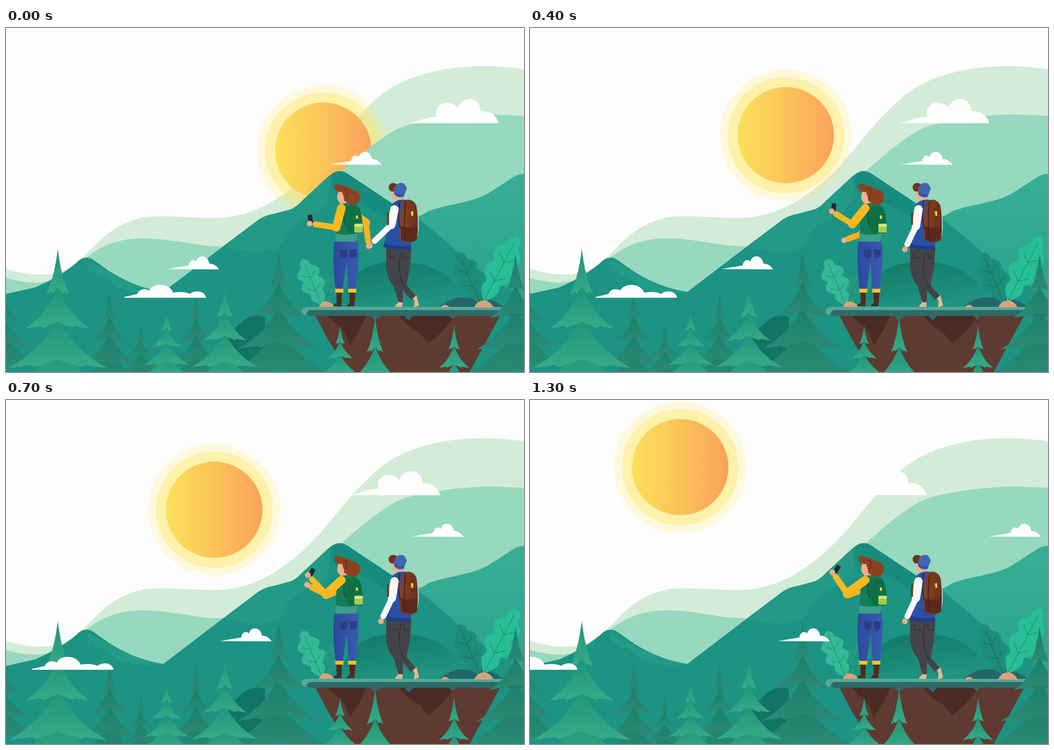
Animation of 800 by 533 pixels, one loop 1.4 s. Source, as an HTML page:

```html
<!DOCTYPE html>
<html lang="en">
<head>
<meta charset="utf-8">
<title>Hikers at sunrise</title>
<style>
html, body { margin: 0; height: 100%; overflow: hidden; background: #fdfdfd; }
svg { display: block; width: 100vw; height: 100vh; }
.limb { fill: none; stroke-linecap: round; stroke-linejoin: round; }
</style>
</head>
<body>
<svg viewBox="0 0 800 533" preserveAspectRatio="none">
  <defs>
    <linearGradient id="sunFill"><stop stop-color="#fbe158"/><stop offset=".55" stop-color="#fbc05a"/><stop offset="1" stop-color="#fba25a"/></linearGradient>
    <linearGradient id="light" x2="0" y2="1"><stop stop-color="#1f9377"/><stop offset="1" stop-color="#36ab89"/></linearGradient>
    <linearGradient id="dark" x2="0" y2="1"><stop stop-color="#1b806b"/><stop offset="1" stop-color="#2b8a75"/></linearGradient>
    <linearGradient id="moundFill" x2=".4" y2="1"><stop stop-color="#127868"/><stop offset="1" stop-color="#1f9480"/></linearGradient>
    <linearGradient id="rightFill" x2="0" y2="1"><stop stop-color="#37ae95"/><stop offset="1" stop-color="#249b88"/></linearGradient>
    <linearGradient id="jeans"><stop stop-color="#2c489c"/><stop offset="1" stop-color="#395bb0"/></linearGradient>
    <linearGradient id="leather"><stop stop-color="#86431f"/><stop offset="1" stop-color="#6b301c"/></linearGradient>
  </defs>

  <rect width="800" height="533" fill="#fdfdfd"/>
  <path fill="#d3ecd7" d="M0 373C25 381 45 384 70 381C130 372 135 308 215 293C250 289 300 296 335 294C390 289 436 258 476 216C505 186 525 152 573 109C610 76 670 59 740 59Q775 60 800 64V533H0Z"/>
  <g id="sun">
    <circle r="102" fill="#fde35a" opacity=".2"/>
    <circle r="90" fill="#fde35a" opacity=".4"/>
    <circle r="74.500" fill="url(#sunFill)"/>
  </g>
  <path fill="#96d9be" d="M0 387C30 397 62 397 85 386C120 362 145 326 210 326C260 326 300 340 340 338L420 330L515 225C540 203 570 175 603 157C640 140 720 134 750 134L800 136V533H0Z"/>
  <path fill="url(#rightFill)" d="M600 310C630 293 640 293 652 284C680 273 720 271 745 256L782 232Q790 226 800 226V533H560Z"/>

  <!-- mountains -->
  <path fill="#1c9383" d="M0 412L45 402Q90 382 114 359Q125 352 136 360L160 377C190 396 218 405 243 409L337 337L390 297Q400 290 414 288L440 281Q449 277 457 268L499 229Q513 216 528 226L600 274L640 298C680 330 700 350 735 378L800 420V533H0Z"/>
  <path fill="#229a87" d="M337 339L390 299Q400 290 414 288L440 281Q449 277 457 268L499 229C502 255 500 278 475 290C450 298 430 312 428 335Q400 355 337 339Z"/>
  <path fill="#178c7e" d="M502 234Q503 223 515 222Q523 222 530 228L600 275C620 290 628 300 634 308C590 300 555 270 520 262Q500 254 502 234Z"/>
  <path fill="#27a08a" opacity=".6" d="M125 360L160 379C190 396 218 405 243 409Q200 415 172 402L150 383L141 386L133 374L127 379Z"/>
  <path fill="#117464" d="M335 490Q372 434 400 448V533H335Z"/>
  <path fill="url(#moundFill)" d="M518 433C520 385 555 362 603 362C660 363 695 382 712 433Z"/>
  <path fill="#25666a" d="M668 433Q690 414 712 418Q745 413 770 433Z"/>
  <g id="back"></g>

  <!-- cliff -->
  <path fill="#5f3a30" d="M477 444H764L716 533H528L498 484Z"/>
  <path fill="#4b2b25" d="M497 446H556L548 465L531 492L522 470ZM607 446H693L672 472L652 489L640 474L622 462Z"/>
  <path fill="#2f6a69" d="M460 436H800V446H695L690 451L684 446H629L622 453L615 446H580L570 452L562 446H470Q462 445 460 436Z"/>
  <path fill="#53aa96" d="M456 438Q458 432 466 432H800V437H470Q466 437 463 445Q457 444 456 438Z"/>
  <g id="plants"></g>
  <g fill="#d8a27c">
    <path d="M483 432Q488 421 496 424Q504 425 506 432Z"/>
    <path d="M723 433Q728 421 740 422Q750 425 753 433Z"/>
    <path d="M671 433Q678 425 685 433Z"/>
  </g>

  <!-- woman -->
  <g id="farArm" class="limb" stroke="#f6b223"></g>
  <path fill="#4b2c22" d="M510 408H519L518 431H506Q506 427 511 426ZM530 408H540L538 431H527Q527 427 531 426Z"/>
  <path fill="url(#jeans)" d="M508 328H543C547 350 543 380 540 405H529L526 362L520 405H509C506 380 504 350 508 328Z"/>
  <path fill="#2a3f86" d="M516 343H527V354L522 357L516 354ZM531 343H542L541 354L536 357L531 354Z"/>
  <path fill="#f8c132" d="M508 404H521V410H509ZM528 404H541V410H529Z"/>
  <path fill="#f0b28b" d="M514 252Q509 264 514 269L519 275H528L526 251Z"/>
  <path fill="#157c5a" d="M514 274Q530 268 542 274L546 305L541 331H508Q511 300 510 283Z"/>
  <path fill="#3a9f86" d="M509 318Q525 323 543 318L541 331H508Z"/>
  <path fill="#0e7047" d="M525 279Q536 271 546 279Q553 300 550 318H529Q522 300 525 279Z"/>
  <path fill="none" stroke="#0a573a" stroke-width="2" d="M524 274Q519 294 525 307"/>
  <rect x="538" y="303" width="13" height="14" rx="2" fill="#a3cc4e"/>
  <path fill="#d5e480" d="M538 304H551V308H538Z"/>
  <ellipse cx="542" cy="293" rx="1.700" ry="3" fill="#f3d343"/>
  <g fill="#8d421f">
    <path d="M507 248Q507 241 514 241Q519 244 524 245Q533 246 535 253L528 270Q521 270 522 263L519 254Q510 255 507 248Z"/>
    <circle cx="535" cy="262" r="12"/>
  </g>
  <path fill="none" stroke="#68301c" stroke-width="1.500" d="M521 249Q529 247 525 263"/>
  <rect id="phone" x="-3.500" y="-6.500" width="7" height="13" rx="1.500" fill="#252632"/>
  <g id="nearArm" class="limb" stroke="#fbb91f"></g>

  <!-- man -->
  <path class="limb" stroke="#f9fafc" stroke-width="8" d="M629 276Q636 300 632 320"/>
  <path fill="#e4b98c" d="M605 420H613L612 432H601Q601 428 605 427ZM627 415L634 414L638 430L630 433L631 424Z"/>
  <path fill="#434447" d="M587 339H626Q625 370 620 391L619 399L633 415L625 421L613 406L613 425H606L599 400Q588 389 587 367Z"/>
  <path class="limb" stroke="#2b2d32" d="M610 348Q602 378 616 402M593 347V356H602M614 347L615 356H623"/>
  <path fill="#eeb18b" d="M597 250L595 259L598 265L604 269H614L611 250Z"/>
  <path fill="#2b50a6" d="M597 272Q608 262 623 268L630 290L625 343Q604 346 583 338L591 305Z"/>
  <path fill="#1f3d8a" d="M584 333Q602 340 625 337V343Q602 345 583 339Z"/>
  <path fill="#713218" d="M591 249Q590 240 599 240L606 243L603 254L594 253Z"/>
  <path fill="#4265b2" d="M599 251Q601 240 610 240Q616 239 619 249L614 262Q605 264 600 258Z"/>
  <path class="limb" stroke="#34519a" stroke-width="3" d="M601 256Q607 261 613 259"/>
  <path fill="url(#leather)" d="M611 275Q613 266 622 266Q631 267 634 276Q638 302 635 326Q633 332 622 332Q611 332 609 326Q607 300 611 275Z"/>
  <path fill="#5d291d" d="M610 307Q622 312 636 307L634 328Q622 334 610 328Z"/>
  <path class="limb" stroke="#4c211a" stroke-width="1.500" d="M608 268Q604 290 609 311M617 270Q614 300 616 326"/>
  <path fill="#f0c340" d="M625 284H629V291H626Z"/>
  <g id="manArm" class="limb" stroke="#f9fafc"></g>
  <path class="limb" stroke="#70331e" stroke-width="3" d="M590 287L590 304"/>

  <g id="front"></g>
  <g fill="#fefefe">
    <path id="cloud0" d="M623 147.500C640 143 655 136 665 138C659 114 688 110 698 124C702 105 733 105 733 129C748 127 758 137 761 147.500Z"/>
    <path id="cloud1" d="M500 211.500L533 206C534 198 541 195 545 200C547 189 563 188 565 203C572 203 577 207 580 212Z"/>
    <path id="cloud2" d="M249 373.500L282 368C283 360 290 357 294 362C296 351 312 350 314 365C321 365 326 369 329 374Z"/>
    <path id="cloud3" d="M182 417L203 412C205 404 217 403 221 407C226 395 252 394 258 410Q274 407 284 412Q288 408 297 408Q307 409 309 418H183Z"/>
  </g>
</svg>
<script>
const $ = id => document.getElementById(id);

// Each tier: start, end and half width, measured from the tip.
const tiers = [[140, 240, 108], [104, 185, 76], [58, 124, 50], [0, 71, 18]];

function tree(x, top, s, fill, wide = 1) {
  return tiers.map(([from, to, half]) => {
    const a = top + from * s, b = top + to * s, w = half * s * wide, h = b - a;
    return `<path fill="url(#${fill})" d="M${x} ${a}
      Q${x - w * .28} ${a + h * .62} ${x - w} ${b}
      L${x - w * .55} ${b - h * .06} L${x - w * .45} ${b - h * .02}
      L${x} ${b - h * .16} L${x + w * .45} ${b - h * .02}
      L${x + w * .55} ${b - h * .06} L${x + w} ${b}
      Q${x + w * .28} ${a + h * .62} ${x} ${a}Z"/>`;
  }).join('');
}

function leaf(x, y, tipX, tipY, width, fill, vein) {
  const dx = tipX - x, dy = tipY - y, len = Math.hypot(dx, dy), pts = [];
  const point = (u, side) => {
    const lobe = .58 + .42 * Math.abs(Math.sin(3.5 * Math.PI * u));
    const w = side * width * Math.sin(Math.PI * u ** 1.15) ** .65 * lobe;
    return [x + dx * u - dy / len * w, y + dy * u + dx / len * w];
  };
  for (let i = 0; i < 40; i++) pts.push(point(i / 40, 1));
  pts.push([tipX, tipY]);
  for (let i = 39; i >= 0; i--) pts.push(point(i / 40, -1));
  let ribs = `M${x} ${y}L${x + dx * .9} ${y + dy * .9}`;
  for (const u of [.42, .7]) for (const side of [-.6, .6])
    ribs += `M${x + dx * (u - .1)} ${y + dy * (u - .1)}L${point(u, side)}`;
  return `<polygon points="${pts.join(' ')}" fill="${fill}"/>
    <path d="${ribs}" fill="none" stroke="${vein}"/>`;
}

$('back').innerHTML =
  tree(-6, 378, .62, 'dark', .92) + tree(160, 408, .62, 'dark', .9) +
  tree(208, 458, .4, 'dark') + tree(293, 412, .58, 'dark', .85) +
  tree(421, 345, .82, 'dark') + tree(80, 342, 1, 'light') +
  tree(248, 437, .46, 'light') + tree(338, 400, .68, 'light');
$('front').innerHTML =
  tree(516, 460, .42, 'light', .95) + tree(570, 447, .78, 'light', .9) +
  tree(692, 460, .54, 'light', .88) + tree(787, 350, .8, 'dark');
$('plants').innerHTML =
  leaf(490, 430, 510, 381, 13, '#249981', '#18816d') +
  leaf(488, 430, 458, 358, 20, '#35b896', '#1c917a') +
  leaf(732, 426, 699, 348, 21, '#1d8c78', '#12705f') +
  leaf(737, 425, 790, 323, 24, '#27bd96', '#168c74');

const times = [0, 200, 400, 600, 900, 1100, 1155];

// Smooth curve through the values at the key times.
function at(values, t) {
  const last = values.length - 1;
  t = Math.min(t, times[last]);
  let i = 0;
  while (i < last - 1 && t > times[i + 1]) i++;
  const slope = k => {
    const a = Math.max(k - 1, 0), b = Math.min(k + 1, last);
    return (values[b] - values[a]) / (times[b] - times[a]);
  };
  const d = times[i + 1] - times[i], u = (t - times[i]) / d, v = 1 - u;
  return v * v * (1 + 2 * u) * values[i] + u * u * (1 + 2 * v) * values[i + 1]
    + u * v * d * (v * slope(i) - u * slope(i + 1));
}

const sun = [[490, 447, 395, 346, 275, 240, 232], [190, 164, 166, 175, 151, 115, 104]];
const speeds = [-.1285, .181, .116, -.204];
const phone = [[470, 469, 469, 471, 474], [296, 287, 278, 270, 262], [-5, 2, 8, 24, 32]];

// Shoulder, then x and y keys of the elbow and the hand.
const arms = {
  farArm: [[533, 285], [[556, 538, 513, 498, 490], [302, 314, 319, 304, 301]],
    [[560, 522, 485, 466, 468], [338, 326, 329, 297, 268]]],
  nearArm: [[518, 279], [[510, 507, 498, 496, 490], [309, 308, 304, 302, 299]],
    [[469, 466, 466, 466, 467], [303, 295, 284, 274, 267]]],
  manArm: [[600, 281], [[595, 596, 596, 596, 596], [305, 306, 307, 307, 307]],
    [[562, 573, 579, 579, 579], [337, 340, 343, 343, 343]]]
};
for (const id in arms) $(id).innerHTML =
  '<polyline stroke-width="13"/><polyline stroke-width="9"/><circle r="4.4" fill="#efae88" stroke="none"/>';

function draw(t) {
  const pos = keys => keys.map(k => at(k, t));
  $('sun').setAttribute('transform', `translate(${pos(sun)})`);
  speeds.forEach((v, i) => $('cloud' + i).setAttribute('transform', `translate(${v * t})`));
  const [px, py, turn] = pos(phone);
  $('phone').setAttribute('transform', `translate(${px} ${py}) rotate(${turn})`);
  for (const id in arms) {
    const [shoulder, elbowKeys, handKeys] = arms[id];
    const elbow = pos(elbowKeys), hand = pos(handKeys);
    const wrist = hand.map((h, i) => h + (elbow[i] - h) * .22);
    const [upper, lower, fist] = $(id).children;
    upper.setAttribute('points', [shoulder, elbow].join(' '));
    lower.setAttribute('points', [elbow, wrist].join(' '));
    fist.setAttribute('cx', hand[0]);
    fist.setAttribute('cy', hand[1]);
  }
}

// Fourteen steps of 100 ms; movement comes to rest before the loop ends.
function tick() {
  const t = Math.floor(performance.now() % 1400 / 100) * 100;
  draw(Math.min(t, 1155));
  requestAnimationFrame(tick);
}
tick();
</script>
</body>
</html>
```
